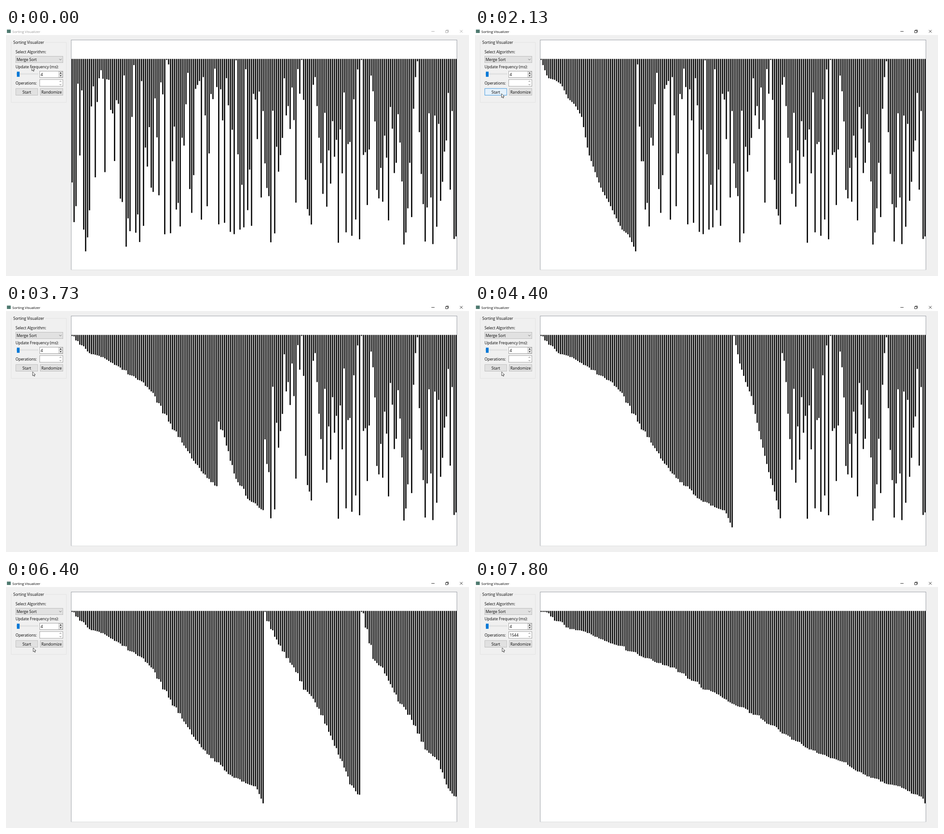
An HTML page with a canvas that plays this animation: 1022 px wide and 548 px high, repeating every 8340 ms.

```html
<!DOCTYPE html>
<html lang="en">
<head>
<meta charset="utf-8">
<title>Sorting Visualizer</title>
<style>
  html, body { margin: 0; width: 100%; height: 100%; overflow: hidden; background: #f0f0f0; }
  canvas { display: block; }
</style>
</head>
<body>
<canvas id="stage" width="1022" height="548"></canvas>
<script>
const ctx = document.getElementById('stage').getContext('2d');
const LOOP = 8340, STEP = 200 / 3, TOP = 68.3;

// Linear interpolation through [position, value] pairs.
function along(points, x) {
  if (x <= points[0][0]) return points[0][1];
  for (let i = 1; i < points.length; i++) {
    const [x0, y0] = points[i - 1], [x1, y1] = points[i];
    if (x <= x1) return y0 + (y1 - y0) * (x - x0) / (x1 - x0);
  }
  return points[points.length - 1][1];
}

let seed = 7;
function random() {
  seed = (seed * 16807) % 2147483647;
  return seed / 2147483647;
}

// Values spread along a rising profile, in random order.
function shuffled(count, ...profile) {
  const gap = (count - 1) / (profile.length - 1);
  const points = profile.map((y, i) => [i * gap, y]);
  const values = Array.from({ length: count }, (_, i) => along(points, i));
  for (let i = count - 1; i > 0; i--) {
    const j = Math.floor(random() * (i + 1));
    [values[i], values[j]] = [values[j], values[i]];
  }
  return values;
}

// Lower end of every bar before sorting.
const initial = [
  ...shuffled(50, 70, 110, 114, 124, 155, 169, 196, 275, 318, 358, 384, 416, 445, 457, 493),
  ...shuffled(25, 80, 108, 134, 168, 242, 294, 386, 408, 453),
  ...shuffled(25, 71, 130, 145, 183, 245, 346, 430, 440, 455),
  ...shuffled(25, 70, 131, 172, 203, 262, 317, 371, 414, 473),
  ...shuffled(25, 91, 142, 187, 242, 256, 298, 366, 451, 474),
  ...shuffled(25, 70, 174, 222, 268, 286, 320, 376, 398, 478),
  ...shuffled(25, 73, 178, 193, 248, 322, 374, 396, 460, 477)
];

// Every write of a merge sort, in order.
const writes = [];
function mergeSort(a, lo, hi) {
  if (lo >= hi) return;
  const mid = (lo + hi) >> 1;
  mergeSort(a, lo, mid);
  mergeSort(a, mid + 1, hi);
  const left = a.slice(lo, mid + 1), right = a.slice(mid + 1, hi + 1);
  for (let k = lo; k <= hi; k++) {
    a[k] = !right.length || (left.length && left[0] <= right[0]) ? left.shift() : right.shift();
    writes.push([k, a[k]]);
  }
}
mergeSort(initial.slice(), 0, initial.length - 1);

const progress = [[810, 0], [3133, 514.5], [4400, 797.5], [6400, 1244.5], [7800, 1544]];
const cursorX = [[70, 57], [390, 46], [1530, 46], [2130, 58.5], [5200, 59], [5400, 60]];
const cursorY = [[70, 86], [390, 137.5], [1530, 137.5], [2130, 145], [2400, 150]];

function rect(x, y, w, h, color) {
  ctx.fillStyle = color;
  ctx.fillRect(x, y, w, h);
}

function box(x, y, w, h, fill, border) {
  rect(x, y, w, h, border);
  rect(x + 0.7, y + 0.7, w - 1.4, h - 1.4, fill);
}

function text(str, x, y, size = 8.65, color = '#000', align = 'left') {
  ctx.font = `${size}px "Open Sans", "Noto Sans", sans-serif`;
  ctx.textAlign = align;
  ctx.fillStyle = color;
  ctx.fillText(str, x, y);
}

function line(points, color, width = 0.8) {
  ctx.beginPath();
  points.forEach(([x, y]) => ctx.lineTo(x, y));
  ctx.strokeStyle = color;
  ctx.lineWidth = width;
  ctx.stroke();
}

function chevron(x, y, dy, half = 2) {
  line([[x - half, y - dy], [x, y + dy], [x + half, y - dy]], '#444');
}

function triangle(x, y, dy) {
  ctx.beginPath();
  ctx.moveTo(x - 2.2, y - dy);
  ctx.lineTo(x, y + dy);
  ctx.lineTo(x + 2.2, y - dy);
  ctx.fillStyle = '#000';
  ctx.fill();
}

function titleBar(active) {
  const color = active ? '#000' : '#999';
  rect(0, 0, 1022, 15.5, '#fff');
  rect(2, 3.5, 8.5, 7.5, '#4f7a70');
  text('Sorting Visualizer', 14, 10.6, 7.7, color);
  line([[939, 7.5], [946, 7.5]], color);
  ctx.strokeRect(970.5, 5.9, 4.6, 4.6);
  line([[972, 5.9], [972, 4.5], [976.6, 4.5], [976.6, 9.1], [975.2, 9.1]], color);
  line([[1002, 4.4], [1008, 10.4]], color);
  line([[1008, 4.4], [1002, 10.4]], color);
}

function button(label, x, w, fill = '#e1e1e1', border = '#adadad') {
  box(x, 133.4, w, 15.5, fill, border);
  text(label, x + w / 2, 144.5, 8.65, '#000', 'center');
}

function controls(t) {
  box(11, 31.5, 122.5, 133, '#f0f0f0', '#dcdcdc');
  rect(14, 28, 73, 8, '#f0f0f0');
  text('Sorting Visualizer', 16, 35.2, 8.5);

  text('Select Algorithm:', 21, 56.2);
  box(21, 62, 105, 15, '#e1e1e1', '#adadad');
  text('Merge Sort', 23.5, 73);
  chevron(120, 69.6, 1.2, 2.4);

  text('Update Frequency (ms):', 21, 89.3);
  box(22, 100.3, 49, 2.4, '#e7eaea', '#d6d6d6');
  rect(24, 96.5, 6, 11.3, '#0078d7');
  box(74, 95, 52, 14.8, '#fff', '#7a7a7a');
  text('4', 76.5, 105.6);
  for (const side of [-1, 1]) {
    box(116, 99.2 + side * 3.2, 9.2, 6.4, '#f0f0f0', '#adadad');
    triangle(120.6, 102.4 + side * 3.2, side * 1.2);
  }

  text('Operations:', 21, 125);
  box(74, 113.6, 52, 15.6, '#fff', '#7a7a7a');
  if (t >= 7790) text(String(writes.length), 76.5, 125);
  chevron(120.2, 118, -1);
  chevron(120.2, 125, 1);

  const pressed = t >= 590 && t < 730, hovered = t >= 390 && t < 2390;
  const colors = pressed ? ['#cce4f7', '#005499'] : hovered ? ['#e5f1fb', '#0078d7'] : [];
  button('Start', 21.4, 49, ...colors);
  button('Randomize', 75, 51);
}

function bars(t) {
  rect(143.6, 26, 852, 508.5, '#828790');
  rect(144.4, 26.8, 850.4, 507.7, '#fff');
  const values = initial.slice();
  const count = Math.floor(along(progress, t));
  for (const [i, y] of writes.slice(0, count)) values[i] = y;
  values.forEach((y, i) => rect(144.65 + i * 4.2583, TOP, 2.7, y + 0.5 - TOP, '#000'));
}

function cursor(x, y) {
  ctx.beginPath();
  [[0, 0], [0, 8.6], [2, 6.8], [3.4, 9.8], [4.8, 9.2], [3.5, 6.3], [6.2, 6.2]]
    .forEach(([dx, dy]) => ctx.lineTo(x + dx, y + dy));
  ctx.closePath();
  ctx.fillStyle = '#fff';
  ctx.fill();
  ctx.strokeStyle = '#000';
  ctx.lineWidth = 0.7;
  ctx.stroke();
}

function draw() {
  const t = Math.floor((performance.now() % LOOP) / STEP + 0.06) * STEP;
  rect(0, 0, 1022, 548, '#f0f0f0');
  titleBar(t >= 590);
  controls(t);
  bars(t);
  cursor(along(cursorX, t), along(cursorY, t));
  requestAnimationFrame(draw);
}
draw();
</script>
</body>
</html>
```
